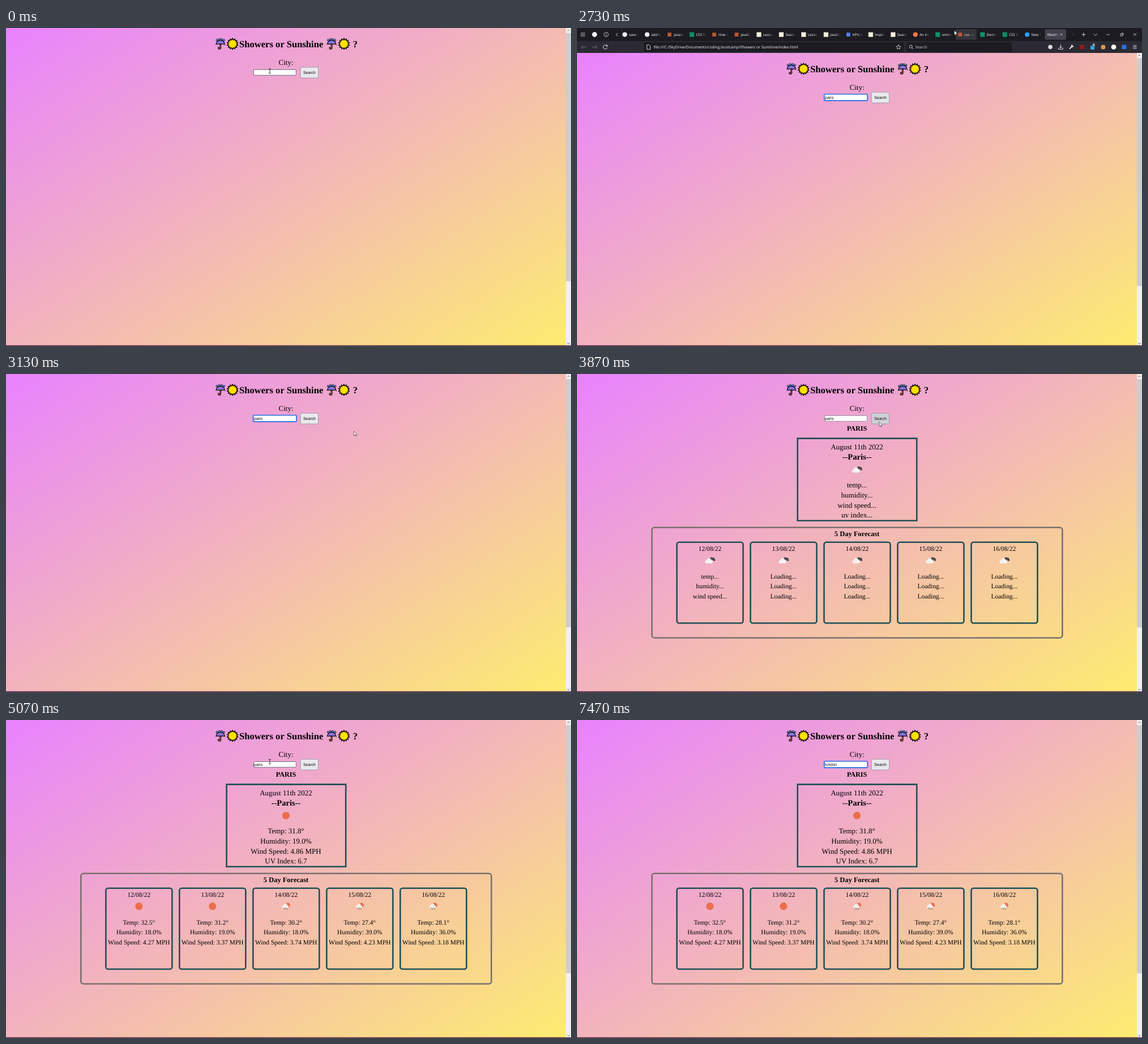
These frames come from a looping animation (998 by 561 pixels, 8000 ms). An HTML page with a canvas:

```html
<!DOCTYPE html>
<html lang="en">
<head>
<meta charset="utf-8">
<title>Showers or Sunshine</title>
<style>
html, body { margin: 0; width: 100%; height: 100%; overflow: hidden; }
canvas { display: block; width: 998px; height: 561px; }
</style>
</head>
<body>
<canvas id="stage"></canvas>
<script>
const W = 998, H = 561, LOOP = 8000, PAGE_W = 989, MID = 494.5, BAR_H = 44;
const SERIF = '"Liberation Serif", "Times New Roman", serif';
const SANS = '"Liberation Sans", Arial, sans-serif';
const UI = '"Open Sans", "Noto Sans", sans-serif';
const TEAL = '#1f5056';

const canvas = document.getElementById('stage');
const ratio = window.devicePixelRatio || 1;
canvas.width = Math.round(W * ratio);
canvas.height = Math.round(H * ratio);
const c = canvas.getContext('2d');
c.textRendering = 'geometricPrecision';

// Pointer stops: time, x, y, shape
const POINTER = [
  [0, 466, 76, 'beam'], [70, 467.5, 78.5, 'beam'], [130, 469, 80.5, 'beam'],
  [730, 476, 81, 'beam'], [800, 483, 84, 'arrow'], [1530, 0, 0, ''],
  [2670, 630, 34, 'arrow'], [2730, 666, 4, 'arrow'], [2800, 674.5, 0.5, 'arrow'],
  [2930, 668, 18, 'arrow'], [3000, 652, 46, 'arrow'], [3070, 634, 76, 'arrow'],
  [3130, 614.3, 100.3, 'arrow'], [3200, 545, 112, 'arrow'], [3400, 538, 96, 'arrow'],
  [3470, 533.5, 84, 'arrow'], [4070, 518, 86, 'arrow'], [4130, 507, 84, 'arrow'],
  [4330, 490, 80, 'beam'], [4400, 475, 77, 'beam'], [4470, 462, 75, 'beam'],
  [4530, 454, 70, 'arrow'], [4730, 468, 70, 'arrow'], [5000, 467, 74.5, 'beam'],
  [5070, 466, 73.5, 'beam'], [6400, 0, 0, '']
];
const WORDS = [
  ['paris', [1530, 1670, 1870, 2070, 2200]],
  ['london', [6400, 6670, 6800, 6870, 7000, 7130]]
];
const CARET = [[470, 1000], [1670, 2730], [5330, 5470], [6400, 7470]];
const FOCUS = [[470, 3670], [5330, LOOP]];

const DAYS = [
  ['12/08/22', 'sun', '32.5', '18.0', '4.27'],
  ['13/08/22', 'sun', '31.2', '19.0', '3.37'],
  ['14/08/22', 'rain', '30.2', '18.0', '3.74'],
  ['15/08/22', 'rain', '27.4', '39.0', '4.23'],
  ['16/08/22', 'rain', '28.1', '36.0', '3.18']
];
const ICONS = {
  g: ['#f1f1f4', 1], s: ['#b9572c', 0], w: ['#0c8f63', 0], b: ['#f4efd8', 0],
  a: ['#4e7fe8', 0], h: ['#ff7a42', 1], f: ['#2a9df4', 1]
};
const TABS = [
  ['g', 'save i'], ['g', 'add lo'], ['s', 'javasc'], ['w', 'CSS St'], ['s', 'How to'],
  ['s', 'JavaSc'], ['b', 'Lesson'], ['b', 'Search'], ['b', 'Lesson'], ['b', 'JavaSc'],
  ['a', 'APIs &'], ['b', 'Implem'], ['b', 'Search'], ['h', 'An Int'], ['w', 'onmou'],
  ['s', 'css - H'], ['w', 'Demos'], ['w', 'CSS :h'], ['f', 'New T']
];

const during = (t, spans) => spans.some(([a, b]) => t >= a && t < b);

function text(str, x, y, size, family = SERIF, color = '#000', align = 'center', weight = '') {
  c.font = `${weight} ${size}px ${family}`;
  c.textAlign = align;
  c.fillStyle = color;
  c.fillText(str, x, y);
}
const bold = (str, x, y, size, align) => text(str, x, y, size, SERIF, '#000', align, 'bold');

function box(x, y, w, h, fill, r = 0, stroke, line = 1) {
  c.beginPath();
  c.roundRect(x, y, w, h, r);
  if (fill) { c.fillStyle = fill; c.fill(); }
  if (stroke) { c.strokeStyle = stroke; c.lineWidth = line; c.stroke(); }
}
// Border drawn inside the given outer edges
const frame = (x, y, w, h, color, line, r = 0, fill) =>
  box(x + line / 2, y + line / 2, w - line, h - line, fill, r, color, line);

function dot(x, y, r, fill) {
  c.beginPath();
  c.arc(x, y, r, 0, Math.PI * 2);
  c.fillStyle = fill;
  c.fill();
}
function path(points, stroke, line = 0.8, fill) {
  c.beginPath();
  points.forEach(([x, y], i) => i ? c.lineTo(x, y) : c.moveTo(x, y));
  if (fill) { c.closePath(); c.fillStyle = fill; c.fill(); }
  if (stroke) { c.strokeStyle = stroke; c.lineWidth = line; c.stroke(); }
}
// Closed star outline with alternating outer and inner radius
function star(x, y, spikes, outer, inner) {
  return Array.from({ length: spikes * 2 + 1 }, (_, i) => {
    const a = -Math.PI / 2 + i * Math.PI / spikes, r = i % 2 ? inner : outer;
    return [x + r * Math.cos(a), y + r * Math.sin(a)];
  });
}

function gradient(h) {
  const a = 147 * Math.PI / 180, sx = Math.sin(a), sy = -Math.cos(a);
  const half = (PAGE_W * sx + h * sy) / 2;
  const g = c.createLinearGradient(PAGE_W / 2 - sx * half, h / 2 - sy * half,
    PAGE_W / 2 + sx * half, h / 2 + sy * half);
  g.addColorStop(0, '#e882ff');
  g.addColorStop(1, '#fdec70');
  c.fillStyle = g;
  c.fillRect(0, 0, PAGE_W, h);
}

function scrollbar(h) {
  box(PAGE_W, 0, 9, h, '#f0f0f0');
  box(PAGE_W, 9, 9, (h - 18) * 0.806, '#cdcdcd');
  const x = PAGE_W + 4.5;
  path([[x - 2, 5.2], [x, 3.2], [x + 2, 5.2]], '#505050', 1);
  path([[x - 2, h - 5.4], [x, h - 3.4], [x + 2, h - 5.4]], '#505050', 1);
}

function umbrella(x) {
  c.lineCap = 'round';
  for (const [color, line] of [['#000', 2.8], ['#c06a38', 1.1]]) {
    c.beginPath();
    c.moveTo(x, 27);
    c.lineTo(x, 35);
    c.arc(x - 1.6, 35, 1.6, 0, Math.PI);
    c.strokeStyle = color;
    c.lineWidth = line;
    c.stroke();
  }
  const drops = [[-6.2, 21.4], [-2.2, 19.8], [2.2, 19.8], [6.2, 21.4]];
  for (const [dx, y] of drops) dot(x + dx, y, 1.9, '#000');
  c.beginPath();
  c.moveTo(x - 7.8, 29);
  c.bezierCurveTo(x - 7, 18.8, x + 7, 18.8, x + 7.8, 29);
  for (let i = 2; i >= -2; i--) c.quadraticCurveTo(x + i * 3.1, 26.4, x + i * 3.1 - 1.55, 29);
  c.closePath();
  c.fillStyle = '#8a72e0';
  c.strokeStyle = '#000';
  c.lineWidth = 1.1;
  c.fill();
  c.stroke();
  for (const [dx, y] of drops) dot(x + dx, y, 1.2, '#5aa6f2');
  c.lineCap = 'butt';
}

function titleSun(x) {
  path(star(x, 28, 14, 9.6, 7.2), '#000', 1.4, '#ffe100');
}

function cloud(x, y, s, color) {
  dot(x - 4.5 * s, y + 1.8 * s, 3.2 * s, color);
  dot(x, y - 1 * s, 4.4 * s, color);
  dot(x + 4.5 * s, y + 1.8 * s, 3.2 * s, color);
  box(x - 4.5 * s, y, 9 * s, 5 * s, color);
}

function weather(kind, x, y) {
  if (kind === 'sun') return dot(x, y, 6.6, '#ec6e4c');
  if (kind === 'rain') {
    dot(x + 3, y - 2, 4.2, '#ec6e4c');
    cloud(x - 1.2, y - 0.5, 0.75, '#f2f2f2');
    for (let i = 0; i < 4; i++) {
      const rx = x - 4 + i * 2.1, ry = y + 2 + (i % 2) * 1.8;
      path([[rx + 0.7, ry], [rx - 0.2, ry + 2]], '#48484a', 0.9);
    }
    return;
  }
  dot(x + 2.7, y - 3.3, 2.2, '#48484a');
  dot(x + 5.8, y - 2.4, 2.5, '#48484a');
  dot(x + 7.5, y - 0.6, 2, '#48484a');
  cloud(x - 1.8, y + 1, 0.88, '#f2f2f2');
}

function report(t) {
  const ready = t >= 3930;
  bold('PARIS', MID, 100, 12.17);
  frame(388.3, 112.3, 213.2, 147.8, TEAL, 2.6);
  text('August 11th 2022', MID, 133.1, 13);
  bold('--Paris--', MID, 151.4, 14.56);
  weather(ready ? 'sun' : 'cloud', MID, 168.5);
  const now = ready
    ? ['Temp: 31.8°', 'Humidity: 19.0%', 'Wind Speed: 4.86 MPH', 'UV Index: 6.7']
    : ['temp...', 'humidity...', 'wind speed...', 'uv index...'];
  now.forEach((s, i) => text(s, MID, 200.3 + i * 17.65, 13));

  frame(131, 269.5, 727.6, 197.3, '#7a706f', 2.6, 4.5);
  bold('5 Day Forecast', MID, 286.3, 12.48);
  DAYS.forEach(([date, icon, temp, hum, wind], i) => {
    const x = 234.8 + i * 130;
    frame(x - 59.7, 295.5, 119.6, 145.3, TEAL, 2.6, 4);
    text(date, x, 311.5, 11.44);
    weather(ready ? icon : 'cloud', x, 328.7);
    const lines = ready ? [`Temp: ${temp}°`, `Humidity: ${hum}%`, `Wind Speed: ${wind} MPH`]
      : i ? Array(3).fill('Loading...') : ['temp...', 'humidity...', 'wind speed...'];
    lines.forEach((s, k) => text(s, x, 360.5 + k * 17.7, 11.44));
  });
}

function typed(t) {
  const [word, keys] = WORDS[t < 6400 ? 0 : 1];
  return word.slice(0, keys.filter(k => k <= t).length);
}

function form(t, pointer) {
  text('City:', MID, 65, 13);
  const hover = pointer[3] === 'beam';
  if (during(t, FOCUS)) {
    box(435.4, 71.4, 79.2, 14, 'rgba(60,130,255,.45)', 2.5);
    frame(436.3, 72.4, 77.2, 12, '#0060df', 1.2, 1.5, '#fff');
  } else {
    frame(437, 73, 75.8, 10.8, hover ? '#676774' : '#8f8f9d', 0.9, 1.3, '#fff');
  }
  const value = typed(t), selected = t >= 5470 && t < 6400;
  c.font = `6.93px ${SANS}`;
  const end = 438.1 + c.measureText(value).width;
  if (selected) box(438.1, 74.2, end - 438.1, 8.4, '#0078d7');
  text(value, 438.1, 80.9, 6.93, SANS, selected ? '#fff' : '#000', 'left');
  if (during(t, CARET)) box(end, 74.2, 0.8, 8.4, '#000');

  const fill = t >= 3670 && t < 3800 ? '#b1b1b9' : t >= 3470 && t < 4070 ? '#d0d0d7' : '#e9e9ed';
  frame(519.8, 68.8, 32.2, 19.6, '#8f8f9d', 0.8, 2.2, fill);
  text('Search', 535.9, 81.1, 6.93, SANS);
}

function page(t, top, pointer) {
  c.save();
  c.translate(0, top);
  gradient(H - top);
  scrollbar(H - top);
  umbrella(378.7);
  titleSun(400.2);
  bold('Showers or Sunshine', 411.9, 33.9, 16.64, 'left');
  umbrella(575.2);
  titleSun(597);
  bold('?', 612.7, 33.9, 16.64, 'left');
  form(t, pointer);
  if (t >= 3800) report(t);
  c.restore();
  box(0, 559.8, W, 1.2, '#5a2149');
}

function mark(x, y, color, round, r = 4) {
  if (round) dot(x, y, r, color);
  else box(x - r, y - r, r * 2, r * 2, color);
}

function label(str, x, width) {
  const fade = c.createLinearGradient(x, 0, x + width, 0);
  fade.addColorStop(0.6, '#fbfbfe');
  fade.addColorStop(1, 'rgba(251,251,254,0)');
  text(str, x, 14, 6.2, UI, fade, 'left');
}

function tabStrip(pointer) {
  const ink = '#fbfbfe';
  box(0, 0, W, 23, '#1c1b22');
  mark(10.3, 11.5, '#59585f', false, 4);
  mark(31, 11.5, '#f4f4f6', true, 4.4);
  c.beginPath();
  c.arc(51.5, 11.5, 3.9, 0, 7);
  c.strokeStyle = ink;
  c.lineWidth = 0.7;
  c.stroke();
  box(51.1, 11, 0.8, 2.6, ink);
  box(51.1, 9.2, 0.8, 0.9, ink);
  path([[72, 8.6], [69.2, 11.5], [72, 14.4]], ink);
  box(79, 0, 0.6, 23, '#45444c');
  if (pointer[3] === 'arrow' && pointer[2] < 22) box(668.7, 2.2, 37.2, 18.6, '#35343b', 2);
  TABS.forEach(([icon, name], i) => {
    const x = 84.4 + i * 39.49;
    mark(x, 11.6, ...ICONS[icon], icon === 's' || icon === 'a' ? 3.4 : 4.1);
    label(name, x + 7.3, 17.5);
  });
  box(826.5, 2.2, 37.5, 18.6, '#42414d', 2);
  label('Weather', 830.5, 22);
  path([[853.8, 9.8], [857.2, 13.2]], ink, 0.7);
  path([[857.2, 9.8], [853.8, 13.2]], ink, 0.7);
  path([[874.5, 8.8], [877.2, 11.5], [874.5, 14.2]], '#55545c');
  path([[891.5, 11.6], [898.3, 11.6]], ink);
  path([[894.9, 8.2], [894.9, 15]], ink);
  path([[912.5, 10.2], [915.7, 13.2], [918.9, 10.2]], ink);
  path([[935.5, 11.8], [941, 11.8]], ink, 0.7);
  frame(959.6, 10, 4.4, 4.4, ink, 0.7);
  path([[961, 9], [965, 9], [965, 13]], ink, 0.6);
  path([[982.8, 8.9], [988, 14.1]], ink, 0.7);
  path([[988, 8.9], [982.8, 14.1]], ink, 0.7);
}

function backArrow(x, dir, color) {
  path([[x - 4 * dir, 33.6], [x + 4 * dir, 33.6]], color);
  path([[x - dir, 30.4], [x - 4 * dir, 33.6], [x - dir, 36.8]], color);
}

function navBar() {
  const ink = '#fbfbfe';
  box(0, 23, W, 21, '#2b2a33');
  backArrow(12, 1, '#77767d');
  backArrow(31, -1, '#77767d');
  c.beginPath();
  c.arc(50, 33.6, 3.5, 0.3, 5.6);
  c.strokeStyle = ink;
  c.lineWidth = 0.9;
  c.stroke();
  path([[53.9, 29.6], [53.9, 32.6], [50.9, 32.6]], null, 0, ink);

  box(118, 25.3, 459, 16.6, '#1c1b22', 2);
  path([[123.5, 29.8], [127, 29.8], [129.5, 32.2], [129.5, 37.6], [123.5, 37.6], [123.5, 29.8]], ink, 0.8);
  text('file:///C:/SkyDrive/Documents/coding.bootcamp/Showers or Sunshine/index.html',
    135.6, 36.1, 6.75, UI, ink, 'left');
  path(star(568, 33.8, 5, 4.3, 2), ink, 0.7);
  box(582, 25.3, 186, 16.6, '#1c1b22', 2);
  c.beginPath();
  c.arc(589.6, 32.8, 2.6, 0, 7);
  c.strokeStyle = ink;
  c.lineWidth = 0.8;
  c.stroke();
  path([[591.4, 34.6], [594, 37.2]], ink);
  text('Search', 597.5, 36.1, 6.75, UI, '#d0d0d6', 'left');

  mark(836, 33.6, '#d9d9de', true, 3.8);
  path([[854.4, 29.6], [854.4, 35]], ink, 0.9);
  path([[852, 32.8], [854.4, 35.2], [856.8, 32.8]], ink, 0.9);
  path([[850.6, 35], [850.6, 37.4], [858.2, 37.4], [858.2, 35]], ink, 0.9);
  path([[870, 36.8], [874, 32.6]], ink, 1.7);
  dot(874.9, 31.8, 2.2, ink);
  path([[874.9, 31.8], [877.3, 29.4]], '#2b2a33', 1.4);
  mark(892, 33.6, '#8e1c22', false, 3.8);
  mark(910.5, 34.6, '#35a3e8', false, 3.5);
  box(910, 26.5, 5.4, 6, '#45505c', 1);
  text('0', 912.7, 31.6, 5.4, UI, '#fff', 'center', 'bold');
  mark(929.4, 33.8, '#d99a4e', true, 4);
  mark(948, 33.6, '#fff', true, 4.4);
  mark(966.5, 33.6, '#2a6fdb', false, 3.9);
  for (let i = 0; i < 3; i++) box(982, 30.6 + i * 2.6, 6.6, 0.8, ink);
}

function drawPointer([, x, y, shape]) {
  if (shape === 'beam') {
    path([[x, y - 3.8], [x, y + 3.8]], '#222', 0.9);
    for (const dy of [-4, 4]) path([[x - 2, y + dy], [x + 2, y + dy]], '#222', 0.8);
  } else if (shape === 'arrow') {
    const outline = [[0, 0], [0, 7.9], [1.8, 6.3], [3, 9], [4.2, 8.5], [3.1, 5.9], [5.5, 5.7], [0, 0]];
    path(outline.map(([dx, dy]) => [x + 0.4 + dx, y + 0.3 + dy]), '#222', 0.6, '#fff');
  }
}

function draw(t) {
  c.setTransform(ratio, 0, 0, ratio, 0, 0);
  const pointer = POINTER.filter(p => p[0] <= t).pop();
  const open = t >= 2730 && t < 3000;
  page(t, open ? BAR_H : 0, pointer);
  if (open) {
    tabStrip(pointer);
    navBar();
  }
  drawPointer(pointer);
}

const start = performance.now();
function tick() {
  draw((performance.now() - start) % LOOP);
  requestAnimationFrame(tick);
}
tick();
</script>
</body>
</html>
```
